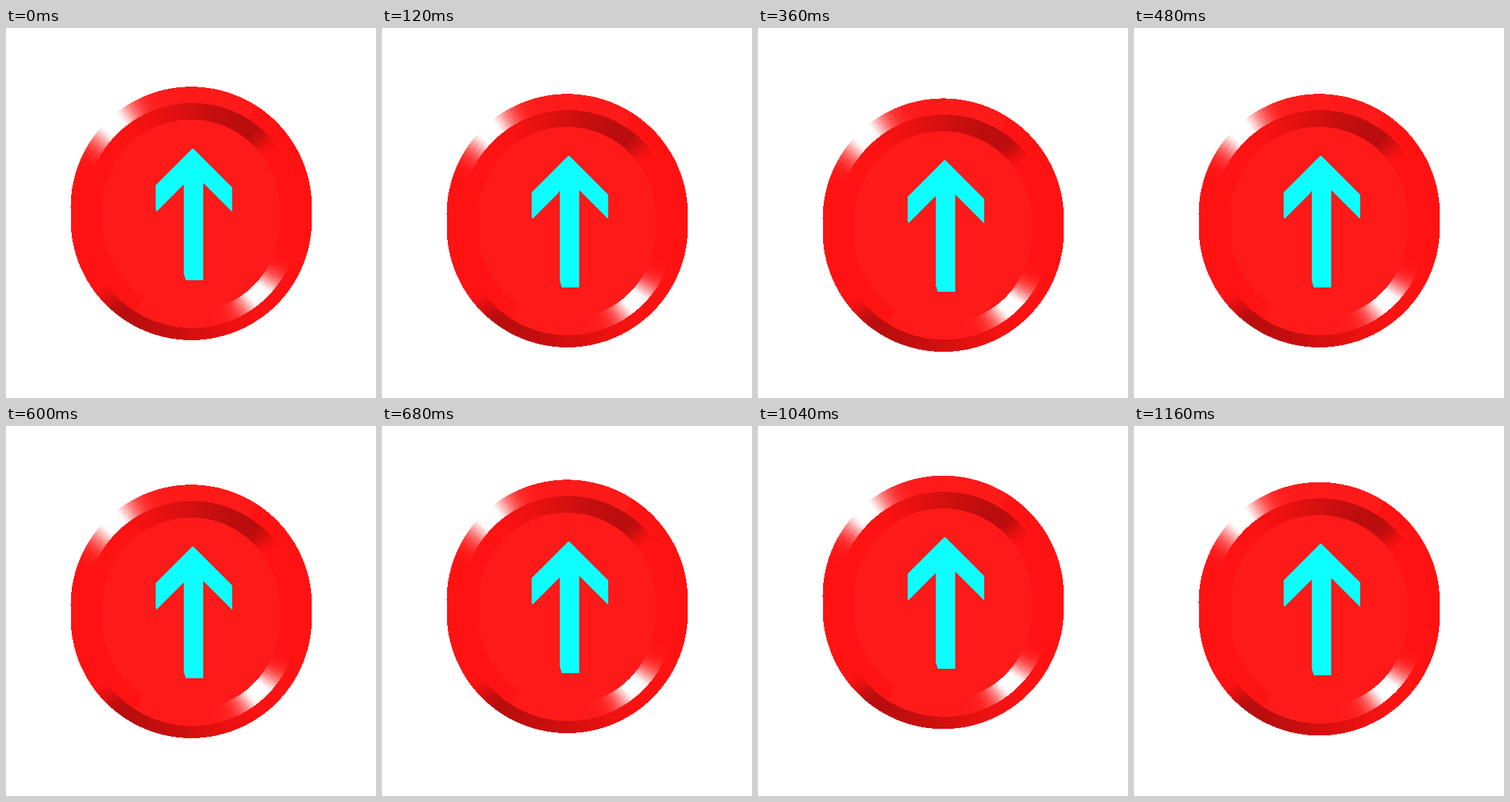
Animation, 512 px wide and 512 px high, one loop 1.2 s. Source, as an HTML page:

```html
<!DOCTYPE html>
<html lang="en">
<head>
<meta charset="utf-8">
<title>Floating arrow button</title>
<style>
html, body { margin: 0; width: 100%; height: 100%; overflow: hidden; background: #fff; }
svg { display: block; width: 100%; height: 100%; }
</style>
</head>
<body>
<svg viewBox="0 0 512 512" shape-rendering="crispEdges"><g id="button"></g></svg>
<script>
const LOOP = 1200, TICK = 40, SWING = 17, STEP = 1.25;
const button = document.getElementById('button');

// Each rim is a circle cut in half, the halves moved apart vertically.
const outer = { x: 256.4, top: 248.2, bottom: 265, r: 166.9 };
const ridge = { x: 257.5, top: 250.8, bottom: 268.2, r: 147 };
const inner = { x: 256, top: 249, bottom: 270, r: 122.3 };

function point(rim, deg) {
  const a = deg * Math.PI / 180;
  const cy = deg <= 180 ? rim.top : rim.bottom;
  return [rim.x + rim.r * Math.cos(a), cy - rim.r * Math.sin(a)];
}

function ease(from, to, v) {
  const k = Math.min(1, Math.max(0, (v - from) / (to - from)));
  return k * k * (3 - 2 * k);
}

// Colour of an outward slope; angles run counter-clockwise from the right.
function tone(deg) {
  const base = deg > 58 && deg < 133 ? 26 : 18;
  const shine = Math.min(1, 1.15 * Math.exp(-(((deg - 133) / 12) ** 2)));
  const shade = 1 - 0.27 * ease(214, 233, deg) * (1 - ease(233, 322, deg));
  const red = Math.round(255 * shade);
  const rest = Math.round(base * shade + (255 - base) * shine);
  return `rgb(${red},${rest},${rest})`;
}

function polygon(points, fill) {
  const el = document.createElementNS('http://www.w3.org/2000/svg', 'polygon');
  el.setAttribute('points', points.map(p => p.map(v => v.toFixed(2)).join()).join(' '));
  el.setAttribute('fill', fill);
  button.append(el);
}

function disc(rim, fill) {
  const points = [[rim.x + rim.r, rim.bottom]];
  for (let d = 0; d <= 180; d += STEP) points.push(point(rim, d));
  points.push([rim.x - rim.r, rim.bottom]);
  for (let d = 180 + STEP; d < 360; d += STEP) points.push(point(rim, d));
  polygon(points, fill);
}

// An inward slope is lit like the outward slope on the opposite side.
function band(a, b, turn) {
  for (let d = 0; d < 360; d += STEP) {
    const e = d + STEP;
    const fill = tone((d + STEP / 2 + turn) % 360);
    polygon([point(a, d), point(a, e), point(b, e), point(b, d)], fill);
  }
}

disc(outer, 'rgb(255,18,18)');
band(outer, ridge, 0);
disc(ridge, 'rgb(255,18,18)');
band(ridge, inner, 180);
disc(inner, 'rgb(255,26,26)');
polygon([
  [257.5, 167], [259.5, 167], [313, 220.5], [313, 254], [272.8, 214.3], [272.8, 348.7],
  [248.8, 348.7], [246, 340], [246, 216], [208, 254.5], [207, 250], [207, 217.2]
], '#0cffff');

function draw(now) {
  const t = Math.floor(now % LOOP / TICK) * TICK;
  const y = SWING * Math.sin(2 * Math.PI * t / LOOP);
  button.setAttribute('transform', `translate(0 ${y.toFixed(2)})`);
}

const start = performance.now();
function frame() {
  draw(performance.now() - start);
  requestAnimationFrame(frame);
}
frame();
</script>
</body>
</html>
```
